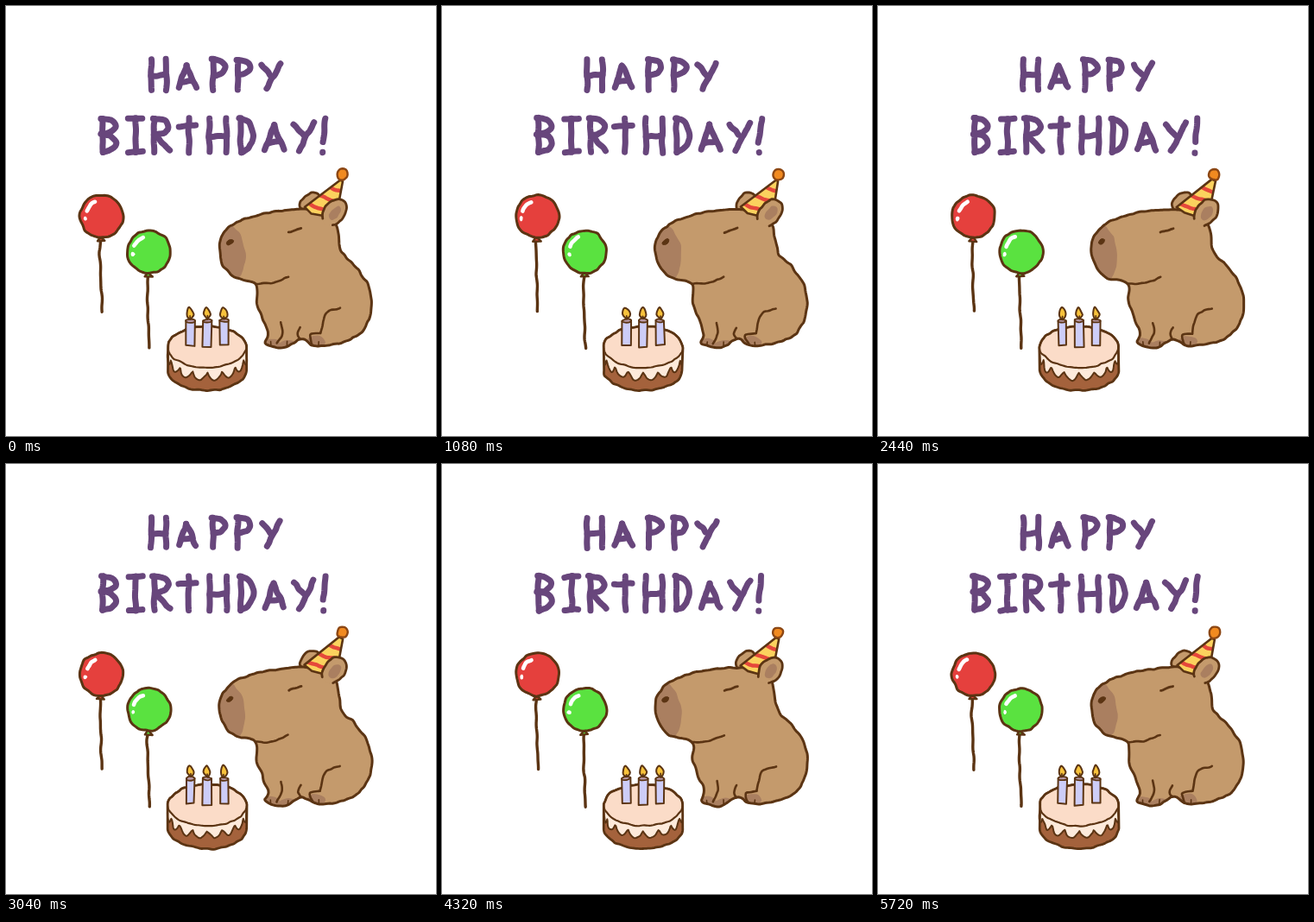
Animation of 498x498 px, one loop 5760 ms. Source, as an HTML page with a canvas:

```html
<!DOCTYPE html>
<html lang="en">
<head>
<meta charset="utf-8">
<title>Happy Birthday!</title>
<style>
html, body { margin: 0; width: 100%; height: 100%; overflow: hidden; background: #fff; }
canvas { display: block; width: 498px; height: 498px; }
</style>
</head>
<body>
<canvas id="stage" width="498" height="498" role="img" aria-label="HAPPY BIRTHDAY!"></canvas>
<script>
const ctx = document.getElementById('stage').getContext('2d');
const LOOP = 5760, STEP = 40, TAU = Math.PI * 2;
const INK = '#5b3413', FUR = '#c49a6c', DARK_FUR = '#aa7f60', PURPLE = '#68467c';
let phase = 0;

// Seeded waves that make every outline boil
let seed = 11;
const rnd = () => (seed = (seed * 16807) % 2147483647) / 2147483647;
function makeWaves() {
  return Array.from({ length: 5 }, (_, i) => {
    const a = rnd() * TAU, k = TAU / (8 + i * 4);
    return { kx: Math.cos(a) * k, ky: Math.sin(a) * k, turns: 11 + Math.floor(rnd() * 20), off: rnd() * TAU };
  });
}
const wavesX = makeWaves(), wavesY = makeWaves();
const shift = (waves, x, y) =>
  0.25 * waves.reduce((s, w) => s + Math.sin(w.kx * x + w.ky * y + w.off + phase * w.turns), 0);

// Catmull-Rom curve through key points
function curve(flat, closed) {
  const p = [];
  for (let i = 0; i < flat.length; i += 2) p.push([flat[i], flat[i + 1]]);
  const n = p.length, out = [];
  const at = i => closed ? p[(i + n) % n] : p[Math.max(0, Math.min(n - 1, i))];
  for (let i = 0; i < (closed ? n : n - 1); i++) {
    const [a, b, c, d] = [at(i - 1), at(i), at(i + 1), at(i + 2)];
    const m = Math.max(1, Math.ceil(Math.hypot(c[0] - b[0], c[1] - b[1]) / 2));
    for (let j = 0; j < m; j++) {
      const t = j / m;
      out.push([0, 1].map(q => b[q] + 0.5 * t * (c[q] - a[q] +
        t * (2 * a[q] - 5 * b[q] + 4 * c[q] - d[q] + t * (3 * (b[q] - c[q]) + d[q] - a[q])))));
    }
  }
  if (!closed) out.push(p[n - 1]);
  return out;
}

function ring(cx, cy, rx, ry, rot = 0, from = 0, to = TAU) {
  const n = Math.max(10, Math.ceil((to - from) * Math.max(rx, ry) / 2));
  return Array.from({ length: n + 1 }, (_, i) => {
    const a = from + (to - from) * i / n, x = rx * Math.cos(a), y = ry * Math.sin(a);
    return [cx + x * Math.cos(rot) - y * Math.sin(rot), cy + x * Math.sin(rot) + y * Math.cos(rot)];
  });
}

function trace(pts, closed) {
  ctx.beginPath();
  for (const [x, y] of pts) ctx.lineTo(x + shift(wavesX, x, y), y + shift(wavesY, x, y));
  if (closed) ctx.closePath();
}
function stroke(pts, width = 2.6, ink = INK, closed = false) {
  trace(pts, closed);
  ctx.strokeStyle = ink;
  ctx.lineWidth = width;
  ctx.stroke();
}
function shape(pts, fill, width = 2.8, ink = INK) {
  trace(pts, true);
  ctx.fillStyle = fill;
  ctx.fill();
  if (width) stroke(pts, width, ink, true);
}
const line = (flat, width, ink) => stroke(curve(flat), width, ink);
function clipped(pts, draw) {
  ctx.save();
  trace(pts, true);
  ctx.clip();
  draw();
  ctx.restore();
}

// Letters: width, then strokes in a unit box
const stem = x => [x, 0, x, 1];
const bowl = (a, b) => [0, a, 0.7, a + (b - a) * 0.12, 1, (a + b) / 2, 0.7, b - (b - a) * 0.15, 0.1, b];
const glyphs = {
  H: [17.5, stem(0), stem(1), [0, 0.55, 1, 0.5]],
  A: [20, [0, 0.92, 0.45, 0.2], [0.45, 0.2, 1, 0.92], [0.15, 0.73, 0.8, 0.68]],
  P: [16, stem(0.1), bowl(0, 0.53)],
  Y: [21.5, [0, 0.18, 0.47, 0.5], [1, 0.12, 0.28, 0.96]],
  B: [15.5, stem(0.1), bowl(0, 0.46), bowl(0.46, 1)],
  I: [14.5, [0, 0.02, 1, 0], stem(0.5), [0, 1, 1, 0.97]],
  R: [17, stem(0.1), bowl(0, 0.5), [0.2, 0.52, 1.05, 0.94]],
  T: [18, [0, 0.24, 1, 0.2], stem(0.6)],
  D: [15, stem(0.1), bowl(0, 1)],
  '!': [4, [0.9, 0, 0.2, 0.7], [0.2, 1, 0.2, 1.01]]
};
function word(text, top, height, size, places) {
  [...text].forEach((c, i) => {
    const [w, ...strokes] = glyphs[c];
    for (const s of strokes)
      line(s.map((v, j) => j % 2 ? top + v * height : places[i] + v * w * size), 7, PURPLE);
  });
}

function balloon(cx, cy, color, length) {
  const top = cy + 28;
  line([cx - 1, top, cx - 1.5, top + length / 4, cx + 0.5, top + length], 3.4);
  shape([[cx - 1, top - 4], [cx - 5, top + 1], [cx + 4, top + 1]], color, 2.4);
  shape(ring(cx, cy, 25, 24.7), color, 3);
  stroke(ring(cx, cy, 18, 18, 0, 3.5, 4.3), 4.6, '#fff');
  shape(ring(cx - 18.5, cy + 3, 2.2, 2.6), '#fff', 0);
}

function candle(x, bottom) {
  shape([[x - 5, 364], [x + 5, 364], [x + 5, bottom], [x - 5, bottom]], '#cdcdf8', 2);
  shape(ring(x, 364.5, 5, 2), '#b99aa8', 1.8);
  shape(curve([x - 1, 349, x + 4, 357, x, 362, x - 4, 357], true), '#f7c23c', 2);
  line([x, 359, x, 363], 1.6);
}

function cake() {
  const cx = 233, cy = 395, r = 45.5, lobes = 8;
  const side = [...ring(cx, cy, r, 24, 0, Math.PI, TAU), ...ring(cx, 422, r, 23.5, 0, 0, Math.PI)];
  const drips = Array.from({ length: 91 }, (_, i) => {
    const a = i / 90 * Math.PI;
    return [cx + r * Math.cos(a), cy + 6 + 24 * Math.sin(a) + 9 * Math.abs(Math.sin(a * lobes))];
  });
  shape(side, '#a4623c', 0);
  shape([...ring(cx, cy, r, 24, 0, Math.PI, TAU), ...drips], '#fdeadb', 2);
  shape(ring(cx, cy, r, 24), '#fbdcc8', 2.2);
  stroke(side, 2.8, INK, true);
  for (const i of [-1, 0, 1]) candle(cx + i * 19.5, i ? 393 : 395);
}

function hat() {
  const cone = [[387, 201], [346, 233], [354, 240], [366, 243], [386, 226], [390, 203]];
  shape(cone, '#fbd25e', 0);
  clipped(cone, () => {
    for (let i = 0; i < 3; i++) {
      const x = 370 - i * 11.5, y = 207 + i * 10;
      line([x, y, x + 12, y + 6, x + 28, y + 10], 4.5, '#e5483b');
    }
  });
  stroke(cone, 2.6, INK, true);
  shape(ring(389.5, 195, 6.2, 6.2), '#f18a20', 2.4, '#8c4714');
}

function capybara() {
  shape(ring(352, 227, 13, 9, -0.7), FUR);
  const body = curve([
    247, 279, 252, 264, 268, 250, 305, 239, 350, 236, 380, 249, 389, 285, 405, 302, 421, 328,
    421, 361, 402, 385, 362, 394, 342, 386, 322, 396, 301, 391, 303, 378, 291, 345, 289, 322,
    264, 314, 251, 299
  ], true);
  shape(body, FUR, 0);
  clipped(body, () => {
    shape(ring(256, 287, 21, 35, -0.08), DARK_FUR, 0);
    for (const [x, y] of [[307, 392], [327, 394], [359, 389]]) shape(ring(x, y, 11, 7), DARK_FUR, 0);
  });
  stroke(body, 3, INK, true);

  line([289, 322, 308, 321, 327, 314]);
  line([318, 367, 320, 378, 314, 391]);
  line([341, 372, 338, 380, 341, 386]);
  line([387, 350, 370, 357, 364, 379]);
  line([364, 379, 352, 381, 355, 392]);
  for (const x of [307, 326, 362]) line([x, 389, x, 394], 1.6);
  line([327, 262, 342, 257.5], 2.8);
  shape(ring(259, 273, 4.2, 2.6, -0.5), INK, 1);

  hat();
  const ear = [380, 239, 17, 12, -0.9];
  shape(ring(...ear), FUR, 0);
  stroke(ring(...ear, -2.6, 2.4), 2.8);
  shape(ring(381, 240, 9.5, 5.5, -0.9), DARK_FUR, 0);
}

function draw(ms) {
  phase = Math.floor((ms % LOOP) / STEP) * STEP / LOOP * TAU;
  ctx.fillStyle = '#fff';
  ctx.fillRect(0, 0, 498, 498);
  ctx.lineCap = ctx.lineJoin = 'round';
  word('HAPPY', 62, 35, 1, [168, 200, 238, 267, 296]);
  word('BIRTHDAY!', 130, 39.5, 1.1, [110, 142, 170, 200, 236, 270, 300, 333, 366]);
  balloon(110.5, 243.5, '#e5403d', 82);
  balloon(165.5, 284.5, '#5ae240', 84);
  capybara();
  cake();
}

const start = performance.now();
function tick() {
  draw(performance.now() - start);
  requestAnimationFrame(tick);
}
tick();
</script>
</body>
</html>
```
